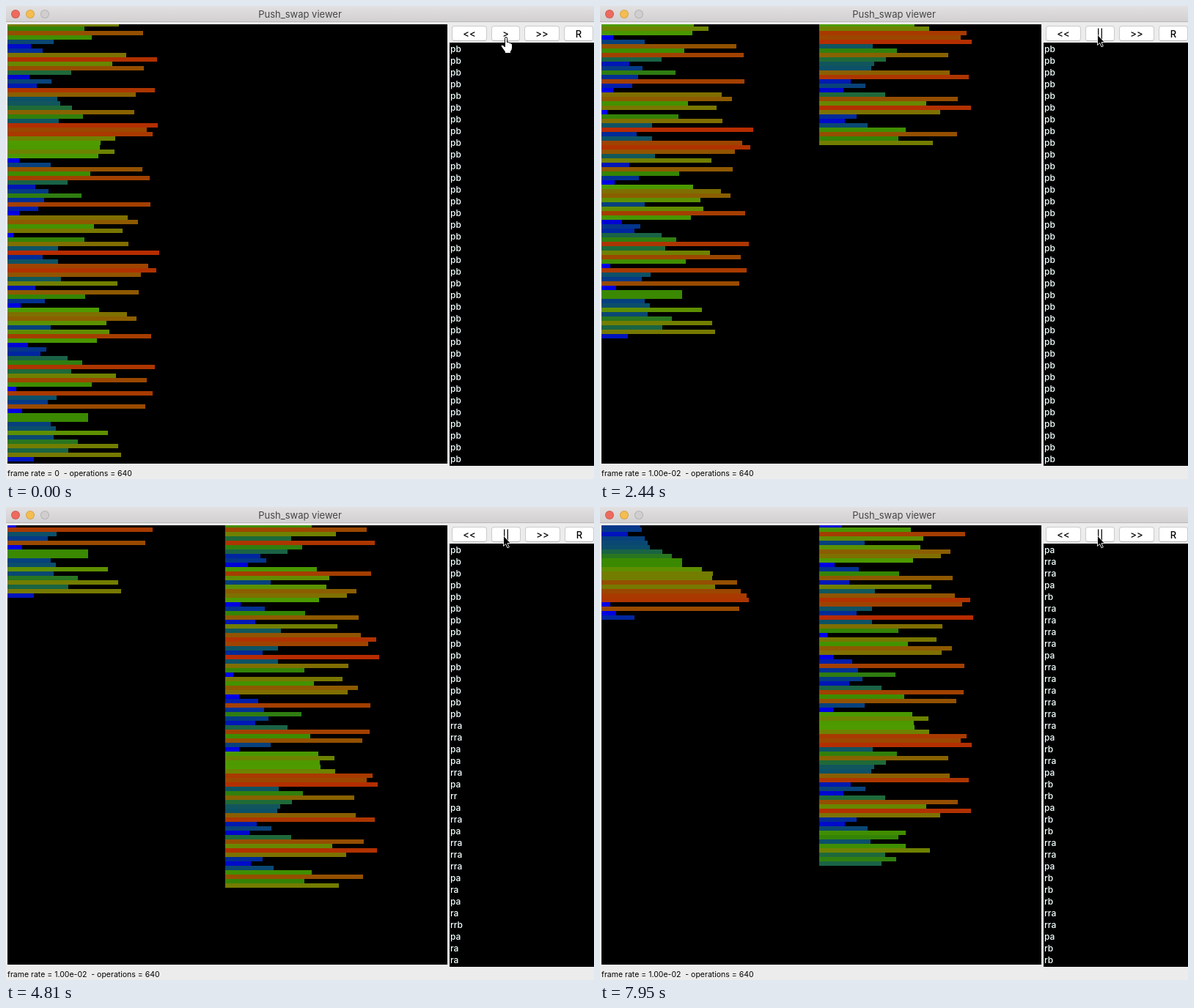
An HTML page with a canvas for the animation above (8000 ms loop, 802 by 646 pixels).

```html
<!DOCTYPE html>
<html lang="en">
<head>
<meta charset="utf-8">
<title>Push_swap viewer</title>
<style>
  html, body { margin: 0; width: 100%; height: 100%; overflow: hidden; }
  body { position: relative; background: #ececec; color: #000; font-family: Inter, "Liberation Sans", sans-serif; }
  body > * { position: absolute; box-sizing: border-box; white-space: pre; }
  #bar { left: 0; top: 0; width: 802px; height: 22px; background: linear-gradient(#e2e0e1, #d2d0d1); border-bottom: 1px solid #b9b7b8;
    text-align: center; font-size: 13px; line-height: 23px; color: #464646; }
  #bar i { position: absolute; top: 5px; width: 12px; height: 12px; border-radius: 50%; box-sizing: border-box; border: 1px solid #0002; }
  #stacks { left: 2px; top: 25px; width: 600px; height: 600px; background: #000; }
  #ops { left: 605px; top: 50px; width: 197px; height: 578px; padding: 1px 0 0 1px; overflow: hidden; background: #000;
    color: #f4ffff; font-size: 12px; font-weight: 500; line-height: 16px; }
  #status { left: 2px; top: 631px; font-size: 10.5px; line-height: 15px; }
  .btn { top: 27px; height: 21px; background: #fff; border: 1px solid #cbcbcb; border-bottom-color: #b5b5b5; border-radius: 4px;
    text-align: center; font-size: 13px; font-weight: 500; line-height: 20px; }
  svg { left: 0; top: 0; width: 802px; height: 646px; }
</style>
</head>
<body>
<div id="bar"><i style="left:7px;background:#ed6a5e"></i><i style="left:27px;background:#f5bd4f"></i><i style="left:47px;background:#d0cecf"></i>Push_swap viewer</div>
<canvas id="stacks" width="600" height="600"></canvas>
<div class="btn" style="left:608px;width:48px">&lt;&lt;</div>
<div class="btn" id="play" style="left:662px"></div>
<div class="btn" id="next" style="width:48px">&gt;&gt;</div>
<div class="btn" id="reset" style="width:40px">R</div>
<div id="ops"></div>
<div id="status"></div>
<svg viewBox="0 0 802 646">
  <path id="hand" fill="#fff" stroke="#000" stroke-linejoin="round" d="M680.5 54V44.5Q680.5 42.5 682 42.5T683.5 44.5V49.5Q685.5 48.5 686.2 50.3Q688 49.5 688.5 51.2Q690.5 51 690.5 53V57Q690.5 60 688.5 62V64.5H680.5V62.5L675.5 55.5Q674.8 53.3 676.5 53Q678 52.8 680.5 56Z"/>
  <path id="arrow" stroke="#fff" stroke-width=".9" d="M678.5 39V53.4L681.7 50.4L684 55.8L686.3 54.8L684 49.6H688.3Z"/>
</svg>
<script>
const $ = id => document.getElementById(id);
const ctx = $('stacks').getContext('2d');
const LOOP = 8000, START = 1220, ROWS = 36;

// Bar ends in pixels, from the top of the first stack
const ENDS = [
  154, 107, 187, 117, 65, 34, 50, 164, 206, 145, 188, 89, 32, 62, 42, 203, 177, 70, 74, 90,
  175, 105, 72, 207, 192, 200, 149, 129, 128, 148, 126, 18, 61, 186, 115, 196, 84, 40, 58, 103,
  52, 197, 44, 18, 166, 180, 120, 159, 10, 107, 167, 71, 209, 50, 71, 194, 205, 184, 75, 152,
  40, 181, 108, 53, 20, 127, 165, 178, 137, 61, 141, 198, 124, 30, 55, 47, 84, 104, 203, 89,
  150, 192, 117, 14, 200, 69, 57, 190, 22, 112, 112, 61, 68, 139, 65, 98, 153, 85, 157, 38];

const OPS = ('pb '.repeat(97) +
  'rra rra pa pa rra pa rr pa rra pa rra rra rra pa ra pa ra rrb pa ra ra ' +
  'ra pa pa rrr rra pa ra ra rrb rrb ' +
  'pa rr ra ra ra pa rb rra rra pa ra pa rb rra pa rr rr pa rr rr ra ra pa ra ' +
  'pa rra rra pa rb rra rra rra rra pa rra rra rra rra rra rra pa rb rra pa rb rb ' +
  'pa rb rb rra rra pa rb rb rb rra rra pa rb rb').split(' ');

// Operations done by a given time
const PACE = [[1220, 1], [2440, 28], [3500, 52], [4810, 83], [6860, 129], [7950, 153]];
// Screen refresh runs: first time, last time, refreshes
const RUNS = [[1220, 1970, 12], [2040, 2840, 13], [2910, 3700, 13], [3780, 4540, 12], [4610, 5360, 12],
  [5420, 6180, 12], [6250, 7000, 12], [7060, 7820, 12], [7880, 7950, 2]];
const SHADES = ['0000f0', '0000d8', '002a9a', '0c5069', '1e693a', '368600', '4e9b00', '6e8200', '826c00', '964c00', 'b62c00']
  .map(s => s.match(/../g).map(c => parseInt(c, 16)));

function shade(end) {
  const p = Math.max(0, Math.min(9.999, (end - 9) / 20)), i = Math.floor(p);
  return `rgb(${SHADES[i].map((c, k) => Math.round(c + (SHADES[i + 1][k] - c) * (p - i)))})`;
}

function refreshTime(t) {
  const [first, last, n] = RUNS.findLast(r => r[0] <= t);
  const step = (last - first) / (n - 1);
  return first + Math.min(n - 1, Math.floor((t - first) / step + .2)) * step;
}

function opsDone(t) {
  if (t < START) return 0;
  t = refreshTime(t);
  const i = Math.max(0, PACE.findLastIndex(p => p[0] <= t + 1));
  if (i === PACE.length - 1) return PACE[i][1];
  const [t0, n0] = PACE[i], [t1, n1] = PACE[i + 1];
  return Math.floor(n0 + (n1 - n0) * (t - t0) / (t1 - t0) + .3);
}

function stacksAfter(count) {
  const a = [...ENDS], b = [];
  const up = s => s.push(s.shift()), down = s => s.unshift(s.pop());
  const run = {
    pa: () => a.unshift(b.shift()), pb: () => b.unshift(a.shift()),
    ra: () => up(a), rb: () => up(b), rr: () => { up(a); up(b); },
    rra: () => down(a), rrb: () => down(b), rrr: () => { down(a); down(b); }
  };
  OPS.slice(0, count).forEach(op => run[op]());
  return [a, b];
}

function drawOps(count) {
  ctx.clearRect(0, 0, 600, 600);
  stacksAfter(count).forEach((stack, side) => stack.forEach((end, i) => {
    ctx.fillStyle = shade(end);
    ctx.fillRect(side * 300 - 3, i * 6 - 3, end + 1, 6);
  }));
  const top = Math.max(0, count - 1);
  $('ops').textContent = OPS.slice(top, top + ROWS).join('\n');
}

function drawControls(on) {
  const shift = on ? 1 : 0;
  $('play').textContent = on ? '||' : '>';
  $('play').style.width = 39 + shift + 'px';
  $('next').style.left = 707 + shift + 'px';
  $('reset').style.left = 761 + shift + 'px';
  $('status').textContent = `frame rate = ${on ? '1.00e-02' : 0}  - operations = 640`;
}

let shown = -1;
function frame() {
  const t = performance.now() % LOOP, count = opsDone(t);
  if (count !== shown) {
    drawOps(count);
    drawControls(count > 0);
    shown = count;
  }
  $('hand').style.visibility = t < 140 ? 'visible' : 'hidden';
  $('arrow').style.visibility = t >= 350 ? 'visible' : 'hidden';
  requestAnimationFrame(frame);
}
frame();
</script>
</body>
</html>
```
